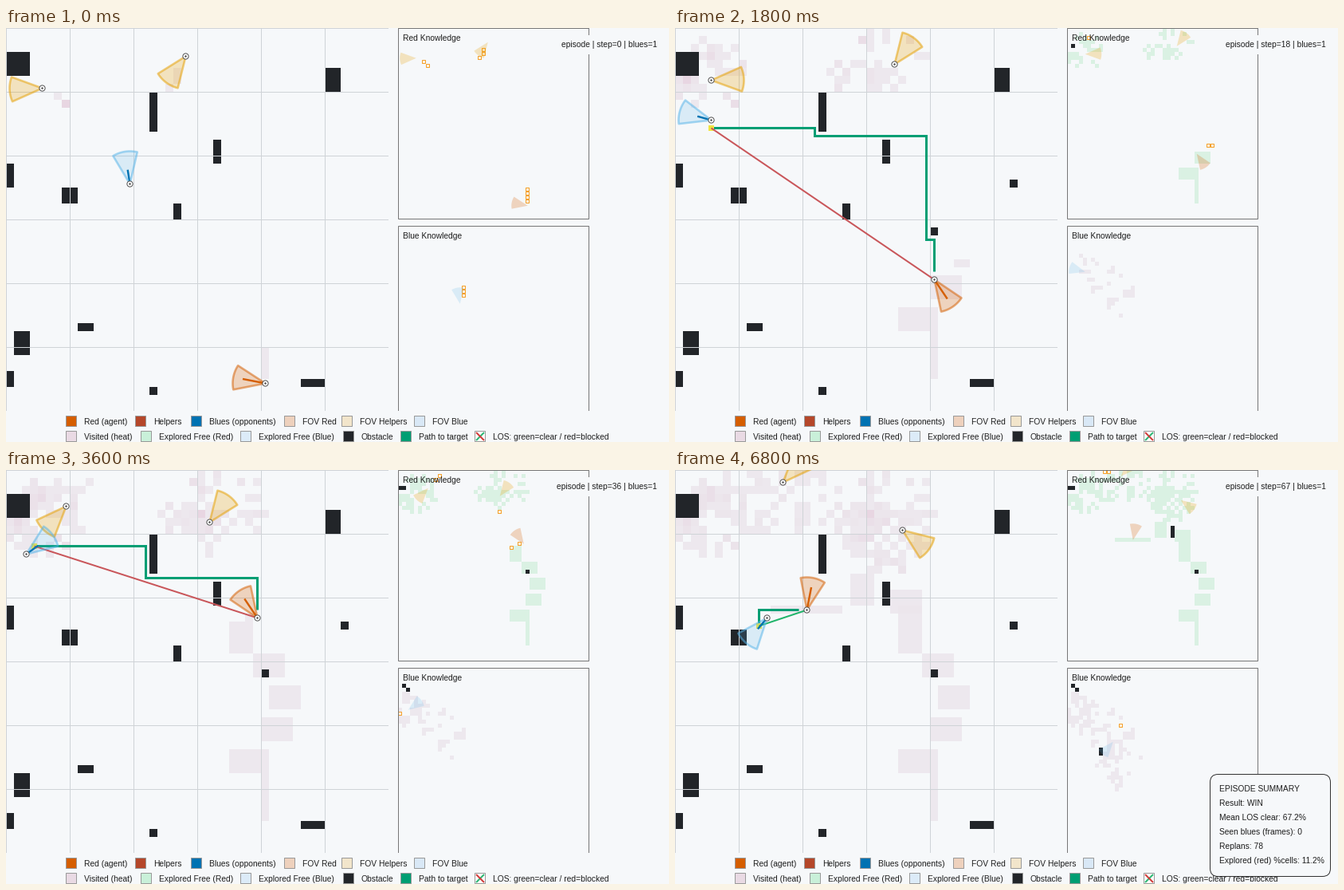
Recreate the animation shown at these times as a matplotlib script. Size 832 by 519 pixels, loop 6900 ms.

```python
import numpy as np
import matplotlib.pyplot as plt
from collections import deque
from matplotlib.animation import FuncAnimation
from matplotlib.patches import Circle, FancyBboxPatch, Polygon, Rectangle

W, H, DPI = 832, 519, 64
PX = 72 / DPI  # points per pixel
N, LAST = 48, 67
BG, INK, DARK = "#f6f8fa", "#1e1e1e", "#222529"
RED, BLUE, GOLD, SKY, GREEN = "#d55e00", "#0072b2", "#e69f00", "#56b4e9", "#009e73"
PALE, PINK = np.array([237, 232, 238]) / 255, np.array([232, 214, 226]) / 255
KEYS = [0, 12, 24, 36, 47, 58, 67]

plt.rcParams["font.family"] = "Liberation Sans"

# Obstacles in cells: x, y, width, height
WALLS = [(0, 3, 3, 3), (40, 5, 2, 3), (18, 8, 1, 5), (26, 14, 1, 3), (0, 17, 1, 3),
         (7, 20, 2, 2), (21, 22, 1, 2), (9, 37, 2, 1), (1, 38, 2, 3), (0, 43, 1, 2),
         (18, 45, 1, 1), (37, 44, 3, 1)]
LATE_WALLS = [(42, 19, 1, 1), (32, 25, 1, 1)]

# Obstacles each team comes to know: step, x, y, width, height
RED_FOUND = [(8, 1, 4, 1, 1), (20, 0, 4, 1, 1), (28, 32, 25, 1, 1), (51, 26, 14, 1, 3)]
BLUE_FOUND = [(30, 1, 4, 1, 1), (32, 2, 5, 1, 1), (43, 8, 20, 1, 2)]

# Red scans one of these areas every seven steps
SCANS = [(32, 38, 1, 6), (28, 35, 5, 3), (32, 31, 4, 3), (33, 27, 4, 3), (31, 23, 4, 3),
         (28, 17, 3, 6), (27, 15, 4, 3), (24, 13, 1, 4), (22, 13, 2, 4), (12, 17, 9, 1)]


class Agent:
    """Moves cell by cell between key points and turns in eighths."""

    def __init__(self, times, xs, ys, turns, color, snap=True):
        self.times, self.xs, self.ys = times, xs, ys
        self.turns, self.color, self.snap = turns, color, snap

    def cell(self, s):
        return tuple(int(np.rint(np.interp(s, self.times, v))) for v in (self.xs, self.ys))

    def angle(self, s):
        a = np.interp(s, KEYS, self.turns)
        if self.snap:
            a = self.turns[0] + 45 * np.rint((a - self.turns[0]) / 45)
        return np.radians(a)


red = Agent([0, 12, 24, 25, 26, 36, 41, 47, 51, 58, 67],
            [32, 32, 32, 32, 31, 31, 31, 27, 27, 23, 16],
            [44, 35, 27, 26, 26, 18, 14, 14, 17, 17, 17],
            [191, 326, 506, 596, 731, 911, 1001], RED)
west = Agent(KEYS, [4, 4, 4, 7, 13, 17, 13], [7, 5, 6, 4, 1, 4, 1],
             [178, 268, 448, 493, 448, 493, 313], GOLD)
east = Agent(KEYS, [22, 26, 28, 25, 26, 25, 28], [3, 3, 4, 6, 9, 7, 7],
             [126, 306, 351, 306, 396, 486, 396], GOLD)
blue = Agent(KEYS, [15, 8, 0, 2, 9, 15, 11], [19, 12, 10, 10, 20, 27, 18],
             [261, 221, 170, -36, -20, -214, -230], SKY, snap=False)
lead = Agent(KEYS, [1, 1, 0, 1, 0, -1, -1], [1, 1, 1, -1, -1, 1, 1], [0] * 7, None)

blocked = {(i, j) for x, y, w, h in WALLS + LATE_WALLS
           for i in range(x, x + w) for j in range(y, y + h)}


def glances(agent, seed):
    """Each step the far cells of one random ray are seen."""
    rng = np.random.default_rng(seed)
    for s in range(LAST + 1):
        (x, y), a, near = agent.cell(s), rng.uniform(0, 2 * np.pi), rng.integers(2, 5)
        for r in range(near, 5):
            yield s, int(np.rint(x + r * np.cos(a))), int(np.rint(y + r * np.sin(a)))


def scans():
    for k, (x, y, w, h) in enumerate(SCANS):
        for n in range(w * h):
            row, col = divmod(n, w)
            yield max(0, 7 * k - 3 + 7 * n // (w * h)), x + w - 1 - col, y + h - 1 - row


def tally(*streams):
    """How often each cell has been seen by each step."""
    count = np.zeros((LAST + 1, N, N))
    for stream in streams:
        for s, i, j in stream:
            if 0 <= i < N and 0 <= j < N and (i, j) not in blocked:
                count[s:, j, i] += 1
    return count


red_seen = tally(scans(), glances(west, 3), glances(east, 8))
blue_seen = tally(glances(blue, 5))


def route(start, goal):
    """Shortest grid path, trying up, left, down, right in turn."""
    moves = [(0, -1), (-1, 0), (0, 1), (1, 0)]
    dist, queue = {goal: 0}, deque([goal])
    while queue:
        x, y = queue.popleft()
        for dx, dy in moves:
            c = (x + dx, y + dy)
            if c not in dist and c not in blocked and 0 <= c[0] < N and 0 <= c[1] < N:
                dist[c] = dist[x, y] + 1
                queue.append(c)
    path, here = [], start
    while here != goal:
        here = next((here[0] + dx, here[1] + dy) for dx, dy in moves
                    if dist.get((here[0] + dx, here[1] + dy), 9999) < dist[here])
        path.append(here)
    return path


def clear_view(a, b):
    pts = np.linspace(a, b, 300) // 10
    return not any((int(x), int(y)) in blocked for x, y in pts)


fig = plt.figure(figsize=(W / DPI, H / DPI), dpi=DPI, facecolor=BG)
ax = fig.add_axes([0, 0, 1, 1])


def box(x, y, w, h, fc, z=1):
    return ax.add_patch(Rectangle((x, y), w, h, fc=fc, ec="none", lw=0, zorder=z))


def frame_box(x, y, w, h, fc, ec, z):
    """Box of w by h pixels with a one-pixel border inside it."""
    return ax.add_patch(Rectangle((x + .5, y + .5), w - 1, h - 1, fc=fc, ec=ec, lw=PX,
                                  joinstyle="miter", snap=False, zorder=z))


def line(xs, ys, color, width=1, z=1):
    return ax.plot(xs, ys, color=color, lw=width * PX, zorder=z, snap=False,
                   solid_capstyle="butt", solid_joinstyle="miter")[0]


def label(x, y, s, z=9, **kw):
    return ax.text(x, y, s, size=10.2 * PX, color=INK, va="center_baseline", zorder=z, **kw)


def layer(x, y, size):
    return ax.imshow(np.zeros((N, N, 4)), extent=(x, x + size, y + size, y),
                     interpolation="nearest", aspect="auto", zorder=1)


heat, red_map, blue_map = layer(0, 0, 480), layer(492, 0, 240), layer(492, 248, 240)
ax.set(xlim=(0, W), ylim=(H, 0))
ax.axis("off")

walls = [box(10 * x, 10 * y, 10 * w, 10 * h, DARK, 2) for x, y, w, h in WALLS + LATE_WALLS]
late = walls[len(WALLS):]
for p in range(0, 480, 80):
    box(p, 0, 1, 480, "#cfd3d7", 3)
    box(0, p, 480, 1, "#cfd3d7", 3)

clips = []
for y, name in ((0, "Red Knowledge"), (248, "Blue Knowledge")):
    clips.append(box(492, y, 240, min(240, 480 - y), "none"))
    frame_box(492, y, 240, 240, "none", "#777777", 5)
    label(498, y + 11.5, name)
box(480, 480, W - 480, H - 480, BG, 5.5)


def found(items, oy):
    return [(s, box(492 + 5 * x, oy + 5 * y, 5 * w, 5 * h, DARK, 3)) for s, x, y, w, h in items]


known = found(RED_FOUND, 0) + found(BLUE_FOUND, 248)

LEGEND = [
    (493, [(75, RED, "Red (agent)"), (162, "#b5472a", "Helpers"), (232, BLUE, "Blues (opponents)"),
           (349, "#eed1bd", "FOV Red"), (421, "#f2e5cb", "FOV Helpers"),
           (512, "#d9e8f6", "FOV Blue")]),
    (512, [(75, "#e9dae4", "Visited (heat)"), (169, "#c9f0d9", "Explored Free (Red)"),
           (294, "#dcebf8", "Explored Free (Blue)"), (423, DARK, "Obstacle"),
           (495, GREEN, "Path to target"), (588, "white", "LOS: green=clear / red=blocked")]),
]
for y, row in LEGEND:
    for x, color, name in row:
        frame_box(x, y - 7, 14, 14, color, "#999999", 6)
        label(x + 23, y, name)
line([590, 600], [517, 507], "#2bb673", 2, 7)
line([590, 600], [507, 517], "#d03a3a", 2, 7)

title = label(817, 20, "", 10, ha="right",
              bbox=dict(boxstyle="square,pad=0.65", fc=BG, ec="none"))
summary = [ax.add_patch(FancyBboxPatch((681.5, 391.5), 131, 108,
                                       boxstyle="round,pad=10,rounding_size=10", fc=BG,
                                       ec="#333333", lw=PX, snap=False, zorder=11))]
for n, s in enumerate(["EPISODE SUMMARY", "Result: WIN", "Mean LOS clear: 67.2%",
                       "Seen blues (frames): 0", "Replans: 78", "Explored (red) %cells: 11.2%"]):
    summary.append(label(683, 399 + 18 * n, s, 12))

moving = []


def keep(artist):
    moving.append(artist)
    return artist


def wedge(x, y, r, a):
    t = a + np.radians(np.linspace(-22, 22, 13))
    return np.vstack([[x, y], np.c_[x + r * np.cos(t), y + r * np.sin(t)]])


def shape(points, **kw):
    return keep(ax.add_patch(Polygon(points, snap=False, **kw)))


def draw_agent(agent, s, panel, oy, arrow=None):
    cx, cy = agent.cell(s)
    x, y, a = 10 * cx + 5.5, 10 * cy + 5.5, agent.angle(s)
    fill = 0.18 if agent.color == SKY else 0.24
    view = wedge(x, y, 41, a)
    shape(view, fc=agent.color, ec="none", alpha=fill, zorder=6)
    if arrow:
        color, size = arrow
        keep(line([x, x + size * np.cos(a)], [y, y + size * np.sin(a)], color, 2.4, 6))
    shape(view, fc="none", ec=agent.color, alpha=.52, lw=2.6 * PX, joinstyle="round", zorder=6)
    small = wedge(492 + x / 2, oy + y / 2, 20.5, a)
    shape(small, fc=agent.color, ec="none", alpha=fill, zorder=4).set_clip_path(panel)
    keep(ax.add_patch(Circle((x, y), 3.6, fc="white", ec="#555555", lw=PX, zorder=8)))
    keep(ax.add_patch(Circle((x, y), 1.2, fc="#444444", ec="none", zorder=8)))


def paint(count, rgb):
    out = np.empty((N, N, 4))
    out[..., :3] = rgb
    out[..., 3] = count > 0
    return out


def draw_maps(s):
    count = red_seen[s]
    top = count.max()
    warm = ((count - 1) / (top - 1)).clip(0, 1) ** 1.5 if top > 1 else np.ones((N, N))
    heat.set_data(paint(count, PALE + warm[..., None] * (PINK - PALE)))
    red_map.set_data(paint(count, np.array([218, 241, 227]) / 255))
    blue_map.set_data(paint(blue_seen[s], PALE))
    for seen, oy in ((red_seen, 0), (blue_seen, 248)):
        before = seen[s - 1] if s else np.zeros((N, N))
        for j, i in np.argwhere((seen[s] > 0) & (before == 0)):
            keep(frame_box(492 + 5 * i, oy + 5 * j, 5, 5, "#fbf3e6", "#f5a02a", 4))


def draw_chase(s):
    start, b, d = red.cell(s), blue.cell(s), lead.cell(s)
    goal = tuple(int(np.clip(p + q, 0, N - 1)) for p, q in zip(b, d))
    path = np.array(route(start, goal)) * 10 + 5.5
    keep(line(path[:, 0], path[:, 1], GREEN, 3, 4))
    p, q = np.array(start) * 10 + 5.5, np.array(goal) * 10 + 5.5
    dx, dy = abs(p - q)
    steep = min(dx, dy) > .7 * max(dx, dy)
    keep(box(q[0] - 3.5, q[1] - 3.5, 7, 7, "#f0e442", 4))
    keep(line([p[0], q[0]], [p[1], q[1]], "#1fb46a" if clear_view(p, q) else "#c9565a",
              3 if steep else 2, 5))


def draw(frame):
    s = min(frame, LAST)
    while moving:
        moving.pop().remove()
    title.set_text(f"episode | step={s} | blues=1")
    for a in summary:
        a.set_visible(frame > LAST)
    for a in late:
        a.set_visible(s > 0)
    for t, a in known:
        a.set_visible(s >= t)
    draw_maps(s)
    if s > 0:
        draw_chase(s)
    draw_agent(west, s, clips[0], 0)
    draw_agent(east, s, clips[0], 0)
    draw_agent(red, s, clips[0], 0, (RED, 29))
    draw_agent(blue, s, clips[1], 248, (BLUE, 18))
    return moving


anim = FuncAnimation(fig, draw, frames=LAST + 2, init_func=lambda: draw(0), interval=100,
                     repeat=True, repeat_delay=0, blit=False)
plt.show()
```
